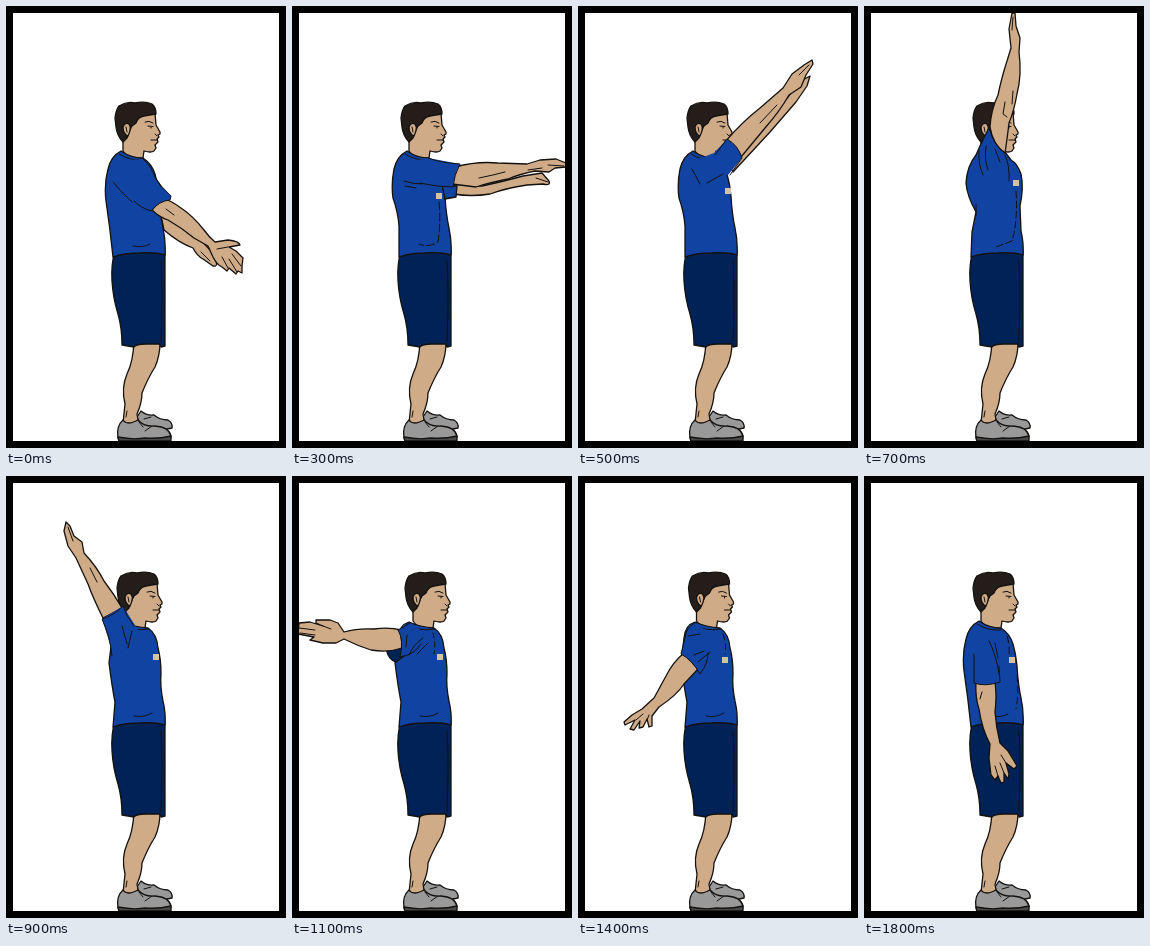
Write an HTML page without scripts that moves like this. It is 280 by 442 pixels and loops after 2.2 s.

```html
<!DOCTYPE html>
<html lang="en">
<head>
<meta charset="utf-8">
<title>Arm circle exercise</title>
<style>
  html, body { margin: 0; width: 100%; height: 100%; overflow: hidden; background: #fff; }
  svg { display: block; width: 100%; height: 100%; }
  path { stroke: #14110f; stroke-width: 1.3; stroke-linejoin: round; stroke-linecap: round; }
  .skin { fill: #cfab87; }
  .shirt { fill: #1144a2; }
  .shorts { fill: #002257; }
  .shoe { fill: #999; }
  .hair { fill: #241d19; }
  .sole { fill: #4a4a4a; }
  .line { fill: none; stroke-width: 1; }
  .bare { stroke: none; }
  .badge { fill: #d2c4a0; }
  /* poses sit side by side, one stage width apart */
  .strip { animation: play 2200ms step-end infinite; }
  @keyframes play {
    0% { transform: translateX(0); }
    13.636% { transform: translateX(-280px); }
    22.727% { transform: translateX(-560px); }
    31.818% { transform: translateX(-840px); }
    40.909% { transform: translateX(-1120px); }
    50% { transform: translateX(-1400px); }
    63.636% { transform: translateX(-1680px); }
    81.818%, 100% { transform: translateX(-1960px); }
  }
</style>
</head>
<body>
<svg viewBox="0 0 280 442">
  <defs>
    <g id="head">
      <path class="skin" d="M117 130L117 145Q126 158 137 152L138 145Q145 147 148 145L150 142L149 139L152 136L151 133L153 131L152 129L154 128L154 126L150 119L149 107L130 103Z"/>
      <path class="hair" d="M117 136Q111 130 110 121L109 112Q110 104 113 100Q121 95 129 97Q139 95 146 98Q150 101 150 108Q143 109 138 110Q132 111 130 117L126 120L123 126L121 132Z"/>
      <path class="skin" d="M122 130Q117 128 117 121Q119 116 123 118Q126 122 122 130Z"/>
      <path class="line" d="M139 116Q143 114 147 117M142 120L147 120.5M145 121L145 122M145 134L151 134M149 128L151 130M120 121L121 126"/>
    </g>
    <g id="torso">
      <path class="shirt" d="M115 145Q105 150 102 163Q99 178 101 192Q106 206 107 220L107 251Q118 247 133 247Q150 246 159 249Q160 236 157 222Q154 208 153 190Q152 178 149 168Q146 158 137 152Q125 152 115 145Z"/>
      <path class="line" d="M113 148Q124 155 137 154"/>
    </g>
    <g id="loose">
      <path class="shirt" d="M115 145Q105 150 102 163Q98 178 100 195Q104 222 107 251Q118 247 133 247Q150 246 159 249Q160 236 157 222Q154 208 153 190Q152 178 149 168Q146 158 137 152Q125 152 115 145Z"/>
      <path class="line" d="M113 148Q124 155 137 154M127 240Q137 242 144 238"/>
    </g>
    <g id="turned">
      <path class="shirt" d="M117 146Q107 149 106 162L103 187Q106 211 109 226L107 251Q118 247 133 247Q150 246 159 249Q160 238 157 225Q154 210 155 198Q155 183 152 172Q151 158 142 152Q128 151 117 146Z"/>
      <path class="line" d="M115 148Q126 156 143 153M128 240Q138 242 146 237"/>
    </g>
    <rect id="badge" class="badge" width="6" height="6"/>
  </defs>

  <rect width="280" height="442" fill="#fff"/>

  <g id="legs">
    <path class="shoe" d="M131 411L135 405Q141 410 148 409Q154 414 162 414Q167 417 166 422L151 425L134 421Z"/>
    <path class="skin" d="M128 336Q127 356 121 368Q115 382 119 398L117 417Q124 424 132 414L131 408Q136 397 136 387Q142 372 149 361Q154 350 154 336Z"/>
    <path class="shoe" d="M112 432Q110 420 117 414Q121 420 132 414Q138 421 149 420Q163 421 165 430L164 435L113 435Z"/>
    <path class="sole" d="M112 431Q127 434 139 432Q153 433 165 430L165 435L113 435Z"/>
    <path class="line" d="M133 416L137 421M138 413L145 411M121 405L120 411M139 425L146 420"/>
    <path class="shorts" d="M109 245Q105 258 106 275Q107 292 112 308Q116 322 116 339L128 341Q130 338 140 338L154 338L155 341L159 340L159 245Z"/>
    <path class="line" d="M155 255Q157 285 155 335"/>
  </g>

  <g class="strip">
    <!-- low front -->
    <g>
      <path class="skin" d="M154 205L158 224Q173 237 187 242Q191 250 197 253L207 260Q212 261 210 255L204 244L190 229Z"/>
      <use href="#head"/>
      <use href="#loose"/>
      <path class="skin" d="M146 204Q153 211 162 214Q176 222 188 232L202 240L207 251Q211 259 216 261L221 265L223 262L230 268L232 265L236 267L236 260L237 252L230 245L223 241L234 239Q233 235 222 234L209 236Q203 231 198 224Q187 210 175 202Q166 195 156 192Z"/>
      <path class="shirt bare" d="M137 153Q145 160 149 171Q154 180 165 190L164 194Q153 195 145 205L133 198L112 176Q113 161 120 154Z"/>
      <path class="line" d="M137 153Q145 160 149 171Q154 180 165 190L164 194Q153 195 145 205Q135 202 128 195M107 176Q115 186 126 196M149 171L155 181M160 203L168 209M195 246L204 255M223 253L231 266M226 248L235 260M216 251L222 262M211 243L222 241"/>
    </g>

    <!-- level front -->
    <g transform="translate(280)">
      <path class="skin" d="M160 178L190 180Q213 175 231 170L250 167L257 175Q259 180 251 178L235 179Q214 182 198 188Q180 191 161 188Z"/>
      <use href="#head"/>
      <use href="#torso"/>
      <path class="shirt" d="M150 179L165 180L164 191L153 193Z"/>
      <path class="skin" d="M163 161Q185 155 206 157L235 158L248 154L264 153L274 157L274 161L263 162L257 166L243 165Q228 168 216 173Q196 177 184 181L160 178Z"/>
      <path class="shirt bare" d="M136 152L168 158Q162 169 161 181Q145 181 127 177L115 175L120 155Z"/>
      <path class="line" d="M136 152Q149 157 168 158Q162 169 161 181Q145 181 128 177M112 175Q121 178 130 178M113 180L124 182M187 172Q202 169 213 166M236 164L250 162M244 172L256 176M256 159L272 160"/>
      <path class="line" stroke-dasharray="8 3" d="M147 196Q149 216 146 236Q137 242 127 238"/>
      <use href="#badge" x="144" y="187"/>
    </g>

    <!-- raised front -->
    <g transform="translate(560)">
      <path class="skin" d="M147 153L184 118L210 91L221 76L232 70L229 80L218 96L192 126L155 166Z"/>
      <use href="#head"/>
      <use href="#torso"/>
      <path class="skin" d="M147 136Q164 116 182 102L205 82L214 68L226 59L234 54L235 58L228 69L223 81L211 89Q202 105 187 122L163 151Z"/>
      <path class="shirt bare" d="M120 153L136 147L149 133Q160 139 164 152L150 169L128 178L115 172Z"/>
      <path class="line" d="M137 149L149 133Q160 139 164 152L152 169M129 177L145 168M114 163L122 178M182 117L199 99M221 69L231 59"/>
      <use href="#badge" x="147" y="182"/>
    </g>

    <!-- overhead -->
    <g transform="translate(840)">
      <use href="#head"/>
      <path class="shirt" d="M125 122Q117 137 112 149Q103 160 102 177Q103 190 112 206L108 226L107 251Q118 247 133 247Q150 246 159 249Q160 238 157 225L156 200Q160 182 157 168Q153 157 147 154L141 146Q133 139 125 122Z"/>
      <path class="skin" d="M126 121Q127 104 134 89Q138 70 143 55L147 42L145 23L148 7L151 7L152 20L156 32L155 46Q158 69 153 88Q150 105 145 117Q143 134 141 147Q129 139 126 121Z"/>
      <path class="line" d="M125 122Q130 140 141 147M115 145Q114 158 119 169M122 140Q120 153 124 164M131 143L136 156M141 149Q146 160 145 175M112 198L112 210M141 96L139 108L143 111M149 85L148 98M149 11L148 24"/>
      <path class="line" stroke-dasharray="7 3" d="M152 185Q154 215 148 235L132 241"/>
      <use href="#badge" x="149" y="174"/>
    </g>

    <!-- raised back -->
    <g transform="translate(1120)">
      <use href="#head" x="2"/>
      <use href="#turned"/>
      <path class="skin" d="M97 142Q87 122 82 108L70 82L62 70L58 55L60 46L64 50L68 60L76 66L78 77Q91 91 98 105Q108 118 116 132Z"/>
      <path class="shirt bare" d="M96 143L117 130Q125 143 132 154L127 176L107 177Z"/>
      <path class="line" d="M106 180Q104 160 96 143Q107 140 117 130Q120 140 128 150M116 150L121 168M126 155L122 172M84 92L91 106M62 51L67 65"/>
      <use href="#badge" x="147" y="178"/>
    </g>

    <!-- level back -->
    <g transform="translate(1400)">
      <use href="#head" x="4"/>
      <use href="#turned"/>
      <path class="shorts" d="M94 172Q96 184 104 186L112 180L109 168Z"/>
      <path class="skin" d="M109 154Q97 151 82 153Q66 152 52 156L46 147L38 144L24 144L24 147L31 150L18 146L7 147L6 158L22 161L18 164L31 167L44 167L52 163Q66 170 79 174Q96 177 110 172Z"/>
      <path class="shirt bare" d="M118 147L106 154Q112 164 108 181L130 174L130 155Z"/>
      <path class="line" d="M118 147L106 154Q112 164 108 181Q122 179 129 168M131 162Q121 169 117 179M136 167L125 178M115 159L114 171M7 152L23 154M8 157L23 159M31 150L39 153"/>
      <path class="line" stroke-dasharray="5 4" d="M141 157Q144 168 142 178"/>
      <use href="#badge" x="145" y="178"/>
    </g>

    <!-- low back -->
    <g transform="translate(1680)">
      <use href="#head" x="1.5"/>
      <use href="#turned"/>
      <path class="skin" d="M106 177Q95 186 88 200L76 222L64 233L54 239L46 246L47 249L57 244L52 253L56 254L62 245L61 252L65 251L69 243L71 251L74 250L74 240L81 231Q99 219 106 208L120 193Z"/>
      <path class="shirt bare" d="M117 147Q108 151 107 162L103 178Q114 184 122 198L131 178L129 155Z"/>
      <path class="line" d="M117 147Q108 151 107 162L103 178Q114 184 122 198Q130 188 130 177M116 179L126 175M120 186L132 176M110 160L122 158M65 238L58 244M71 239L69 244"/>
      <path class="line" stroke-dasharray="6 4" d="M145 158Q149 169 147 178"/>
      <use href="#badge" x="144" y="181"/>
    </g>

    <!-- at rest -->
    <g transform="translate(1960)">
      <use href="#head"/>
      <use href="#loose"/>
      <path class="skin" d="M112 205Q111 221 115 233Q118 253 126 268L125 282L127 299L131 304L134 300L137 307L140 306L140 297L144 303L145 298L142 287L150 293L153 290L144 275L136 267Q132 251 131 236Q133 220 131 206Z"/>
      <path class="shirt bare" d="M119 154Q110 163 111 180L110 207Q121 211 136 206Q137 191 132 176L132 157Z"/>
      <path class="line" d="M110 178L110 207Q121 211 136 206L135 190M125 165Q132 178 135 198M131 167L134 182M118 216L116 223M131 290L134 300M136 287L140 297M137 279L142 287"/>
      <path class="line" stroke-dasharray="7 4" d="M143 160Q146 170 145 178M153 199Q155 217 152 233"/>
      <use href="#badge" x="145" y="181"/>
    </g>
  </g>

  <path class="bare" d="M0 0H280V442H0ZM7 7V435H273V7Z" fill="#000" fill-rule="evenodd"/>
</svg>
</body>
</html>
```
